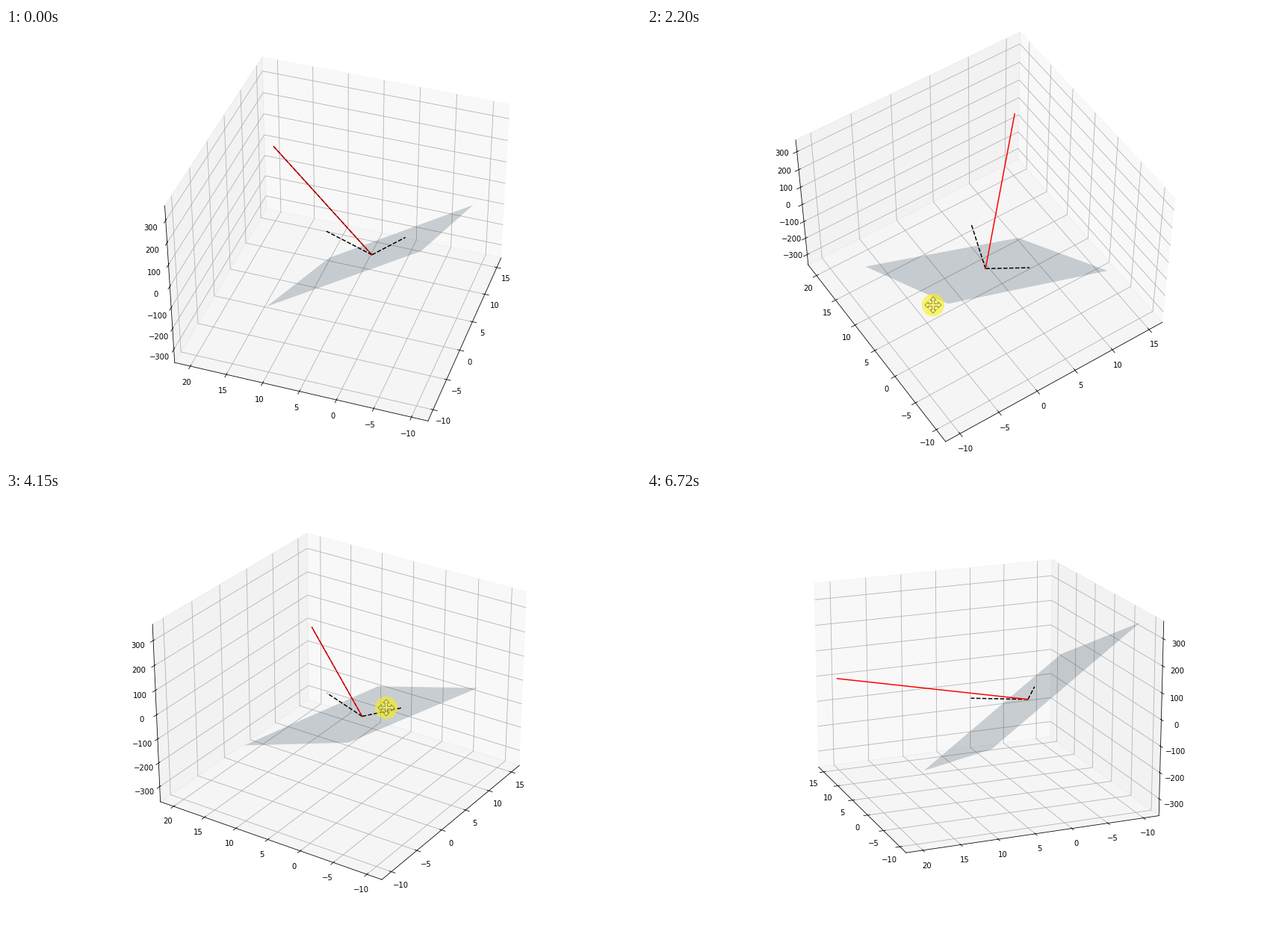
Animation, 850 px wide and 584 px high, one loop 7000 ms. Source, as a matplotlib script:

```python
import numpy as np
import matplotlib.pyplot as plt
from matplotlib.animation import FuncAnimation
from matplotlib.patches import Circle, Polygon
from matplotlib.transforms import Affine2D
from mpl_toolkits.mplot3d.art3d import Poly3DCollection

W, H, DPI = 850, 584, 72
STEP, COUNT = 70, 100
SIDE, LEFT, BOTTOM = 550, 168, 26.6
ENTER, LEAVE = 210, 6700

# turning points of the drag: time (ms), azimuth, elevation, pointer x, y
DRAG = np.array([
    (600, 198.7, 38.5, 540, 340),
    (1570, 217.4, 41.5, 414, 360),
    (2200, 236.5, 51.2, 383, 371),
    (3040, 253.2, 32.3, 371, 299),
    (3590, 248, 30, 388, 294),
    (4155, 213.8, 27.7, 508, 289),
    (4785, 177.5, 21, 626, 271),
    (5040, 165, 20, 666, 264),
])
TIMES, POSES = DRAG[:, 0], DRAG[:, 1:]
SPEEDS = np.gradient(POSES, TIMES, axis=0)
SPEEDS[0] = 0

# moves outside the drag, in the same four values
ARRIVAL = np.array([0, 0, -89, -83])
NUDGE = np.array([-7.1, -2.6, 23, -7])
EXIT = np.array([0, 0, 116, 334])


def ease(t, start, end):
    s = np.clip((t - start) / (end - start), 0, 1)
    return s * s * (3 - 2 * s)


def drag_pose(t):
    """Smooth cubic path through the turning points."""
    t = np.clip(t, TIMES[0], TIMES[-1])
    k = min(np.searchsorted(TIMES, t, side="right"), len(TIMES) - 1) - 1
    span = TIMES[k + 1] - TIMES[k]
    s = (t - TIMES[k]) / span
    blend = s * s * (3 - 2 * s)
    return (POSES[k] * (1 - blend) + POSES[k + 1] * blend
            + span * s * (1 - s) * (SPEEDS[k] * (1 - s) - SPEEDS[k + 1] * s))


def pose(t):
    return (drag_pose(t)
            - ARRIVAL * (1 - ease(t, ENTER, 340))
            + NUDGE * ease(t, 5840, 6150)
            + EXIT * ease(t, 6150, 6590))


def padded(lo, hi, share):
    pad = (hi - lo) * share
    return lo - pad, hi + pad


fig = plt.figure(figsize=(W / DPI, H / DPI), dpi=DPI, facecolor="white")
ax = fig.add_axes([LEFT / W, BOTTOM / H, SIDE / W, SIDE / H],
                  projection="3d", computed_zorder=False)

# limits include the small gap between the data and the panes
PAD = 0.05 + 1.1 / 48
ax.set_xticks(range(-10, 16, 5))
ax.set_yticks(range(-10, 21, 5))
ax.set_zticks(range(-300, 301, 100))
ax.set_xlim(*padded(-10, 15, PAD))
ax.set_ylim(*padded(-10, 20, PAD))
ax.set_zlim(*padded(-350, 350, 1 / 48))

# plane through the zero point, perpendicular to the normal
normal = np.array([15, 20, 1])
corners = [(x, y, -normal[0] * x - normal[1] * y)
           for x, y in ((-10, -10), (10, -10), (10, 10), (-10, 10))]
plane = Poly3DCollection([corners], facecolors=[(0.037, 0.14, 0.212, 0.2)],
                         edgecolors="none", zorder=1)
ax.add_collection3d(plane)


def vector(tip, color, style, order):
    line, = ax.plot(*[(0, c) for c in tip], color=color, ls=style,
                    lw=1.5, zorder=order)
    return line


vector((2, 7, 8), "black", "--", 2)
vector((4, -3, 0), "black", "--", 2)
vector(normal, "red", "-", 3)
shade = vector(normal, "black", "--", 4)

# pointer: yellow halo with a four-way move sign
overlay = fig.add_axes([0, 0, 1, 1], zorder=5)
overlay.set_xlim(0, W)
overlay.set_ylim(H, 0)
overlay.axis("off")

arm = np.array([(1.6, 1.6), (1.6, 6.5), (4.2, 6.5), (0, 11),
                (-4.2, 6.5), (-1.6, 6.5)])
turn = np.array([(0, 1), (-1, 0)])
outline = np.vstack([arm @ np.linalg.matrix_power(turn, k) for k in range(4)])
halo = Circle((0, 0), 15, fc=(0.98, 0.95, 0.05, 0.6), ec="none")
sign = Polygon(outline, closed=True, fc=(1, 1, 0.85, 0.25), ec="#7d7838",
               lw=0.8)
pointer = [halo, sign]
for part in pointer:
    overlay.add_patch(part)


def draw(i):
    t = i * STEP + 30
    azim, elev, x, y = pose(t)
    ax.view_init(elev=elev, azim=azim)
    # the dashes over the normal fade as it turns sideways
    shade.set_alpha(0.5 * max(0, 1 - abs(azim - 199) / 38))
    place = Affine2D().translate(x, y) + overlay.transData
    for part in pointer:
        part.set_transform(place)
        part.set_visible(ENTER <= t < LEAVE)
    return pointer


anim = FuncAnimation(fig, draw, frames=COUNT, interval=STEP,
                     repeat=True, repeat_delay=0, blit=False)
plt.show()
```
